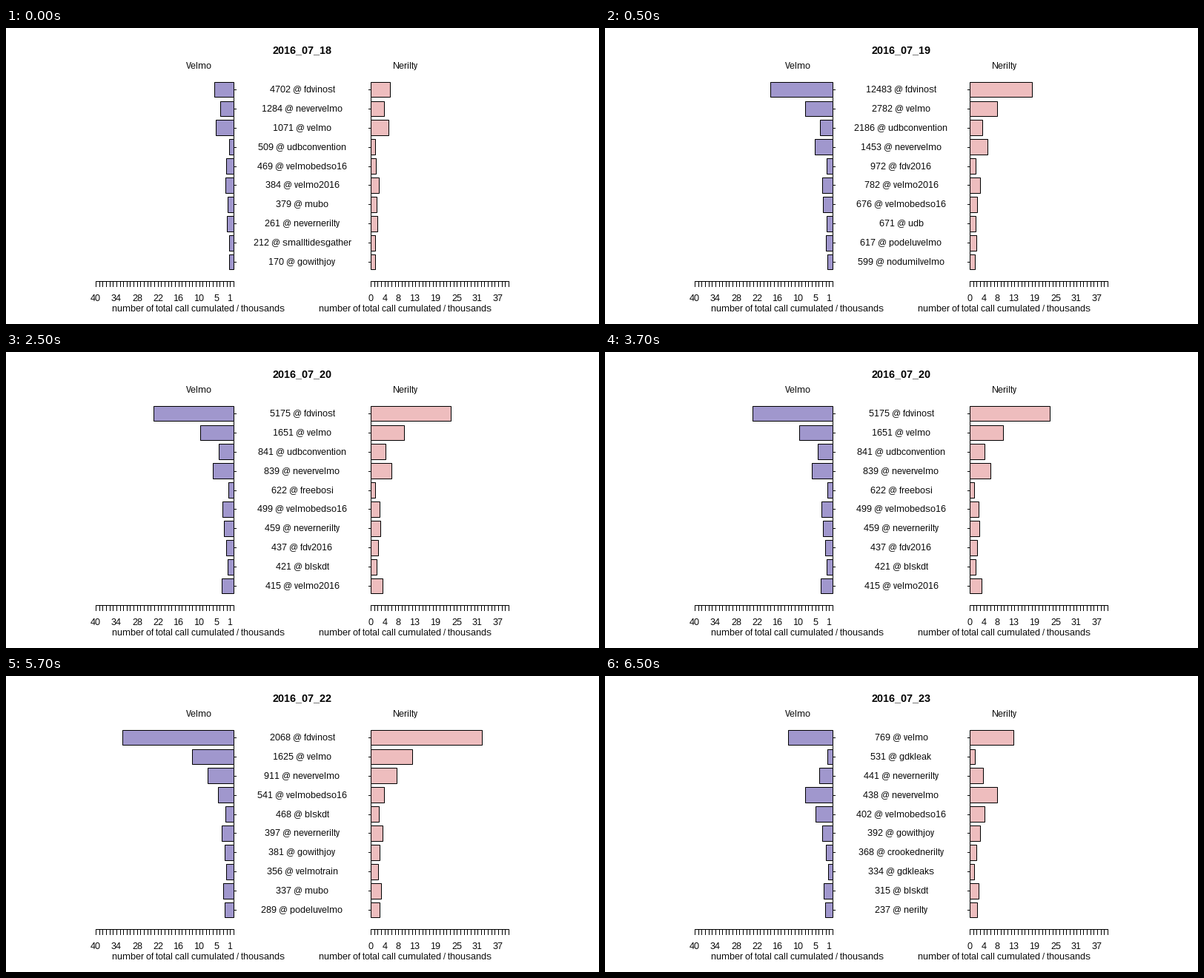
Animation, 800 px wide and 400 px high, one loop 8000 ms. Source, as a matplotlib script:

```python
import matplotlib.pyplot as plt
from matplotlib.animation import FuncAnimation
from matplotlib.patches import Rectangle

plt.rcParams.update({
    "font.family": "Liberation Sans",
    "text.hinting": "native",
    "text.hinting_factor": 1,
    "toolbar": "None",
})

DPI = 100
PX = 72 / DPI                      # one pixel in points
LEFT, RIGHT, CENTER = 307, 492, 399.5
SCALE = 4.65                       # pixels per thousand
PURPLE, PINK = "#A097CD", "#EEBDBE"

# Each day: date, then (count, tag, left width[, right width]) in pixels.
DAYS = [
    ("2016_07_18", [
        (4702, "fdvinost", 26), (1284, "nevervelmo", 18), (1071, "velmo", 24),
        (509, "udbconvention", 6), (469, "velmobedso16", 10, 7),
        (384, "velmo2016", 11), (379, "mubo", 8), (261, "nevernerilty", 9),
        (212, "smalltidesgather", 6), (170, "gowithjoy", 6)]),
    ("2016_07_19", [
        (12483, "fdvinost", 84), (2782, "velmo", 37),
        (2186, "udbconvention", 17), (1453, "nevervelmo", 24),
        (972, "fdv2016", 8), (782, "velmo2016", 14),
        (676, "velmobedso16", 13, 10), (671, "udb", 8),
        (617, "podeluvelmo", 9), (599, "nodumilvelmo", 7)]),
    ("2016_07_20", [
        (5175, "fdvinost", 108), (1651, "velmo", 45),
        (841, "udbconvention", 20), (839, "nevervelmo", 28),
        (622, "freebosi", 7, 6), (499, "velmobedso16", 15, 12),
        (459, "nevernerilty", 13), (437, "fdv2016", 10),
        (421, "blskdt", 8), (415, "velmo2016", 16)]),
    ("2016_07_22", [
        (2068, "fdvinost", 150), (1625, "velmo", 56), (911, "nevervelmo", 35),
        (541, "velmobedso16", 21, 18), (468, "blskdt", 11),
        (397, "nevernerilty", 16), (381, "gowithjoy", 12),
        (356, "velmotrain", 10), (337, "mubo", 14), (289, "podeluvelmo", 12)]),
    ("2016_07_23", [
        (769, "velmo", 60, 59), (531, "gdkleak", 7), (441, "nevernerilty", 18),
        (438, "nevervelmo", 37), (402, "velmobedso16", 23, 20),
        (392, "gowithjoy", 14), (368, "crookednerilty", 9),
        (334, "gdkleaks", 6), (315, "blskdt", 12), (237, "nerilty", 10)]),
]
HOLDS = [1, 4, 4, 4, 3]            # half seconds per day
SCHEDULE = [day for day, hold in zip(DAYS, HOLDS) for _ in range(hold)]

fig = plt.figure(figsize=(8, 4), dpi=DPI, facecolor="white")
ax = fig.add_axes([0, 0, 1, 1])
ax.set(xlim=(0, 800), ylim=(400, 0))
ax.axis("off")


def line(x0, y0, x1, y1):
    ax.plot([x0, x1], [y0, y1], color="black", lw=PX, snap=True,
            solid_capstyle="projecting", zorder=3)


def label(x, baseline, text="", size=12, weight="normal"):
    return ax.text(x, baseline, text, ha="center", va="baseline",
                   fontsize=size * PX, fontweight=weight)


def bar(color):
    return ax.add_patch(Rectangle((0, 0), 0, 0, fc=color, ec="black", lw=PX,
                                  snap=True, joinstyle="miter"))


def row_y(i):
    return 83 + 25.9 * i


def scale_axis(origin, direction, numbers, middle):
    def at(value):
        return origin + direction * round(SCALE * value)

    line(at(0), 342, at(40), 342)
    for value in range(41):
        line(at(value), 342, at(value), 349)
    for value in numbers:
        label(at(value), 369, str(value))
    label(middle, 383, "number of total call cumulated / thousands")


scale_axis(LEFT, -1, (40, 34, 28, 22, 16, 10, 5, 1), 259.5)
scale_axis(RIGHT, 1, (0, 4, 8, 13, 19, 25, 31, 37), 538.5)
label(260, 55, "Velmo")
label(539, 55, "Nerilty")

for x, tip in ((LEFT, LEFT + 3), (RIGHT, RIGHT - 3)):
    line(x, 83, x, 316)
    for i in range(10):
        y = round(row_y(i))
        line(x, y, tip, y)

title = label(CENTER, 34, size=14, weight="bold")
rows = [(bar(PURPLE), bar(PINK), label(CENTER, round(row_y(i)) + 4))
        for i in range(10)]


def update(frame):
    date, entries = SCHEDULE[frame]
    title.set_text(date)
    for i, (row, entry) in enumerate(zip(rows, entries)):
        left, right, text = row
        count, tag, width, *other = entry
        top, bottom = round(row_y(i) - 10.36), round(row_y(i) + 10.36)
        left.set_bounds(LEFT - width, top, width, bottom - top)
        right.set_bounds(RIGHT, top, other[0] if other else width, bottom - top)
        text.set_text(f"{count} @ {tag}")
    return []


anim = FuncAnimation(fig, update, frames=len(SCHEDULE), interval=500,
                     repeat=True, repeat_delay=0, blit=False)
plt.show()
```
